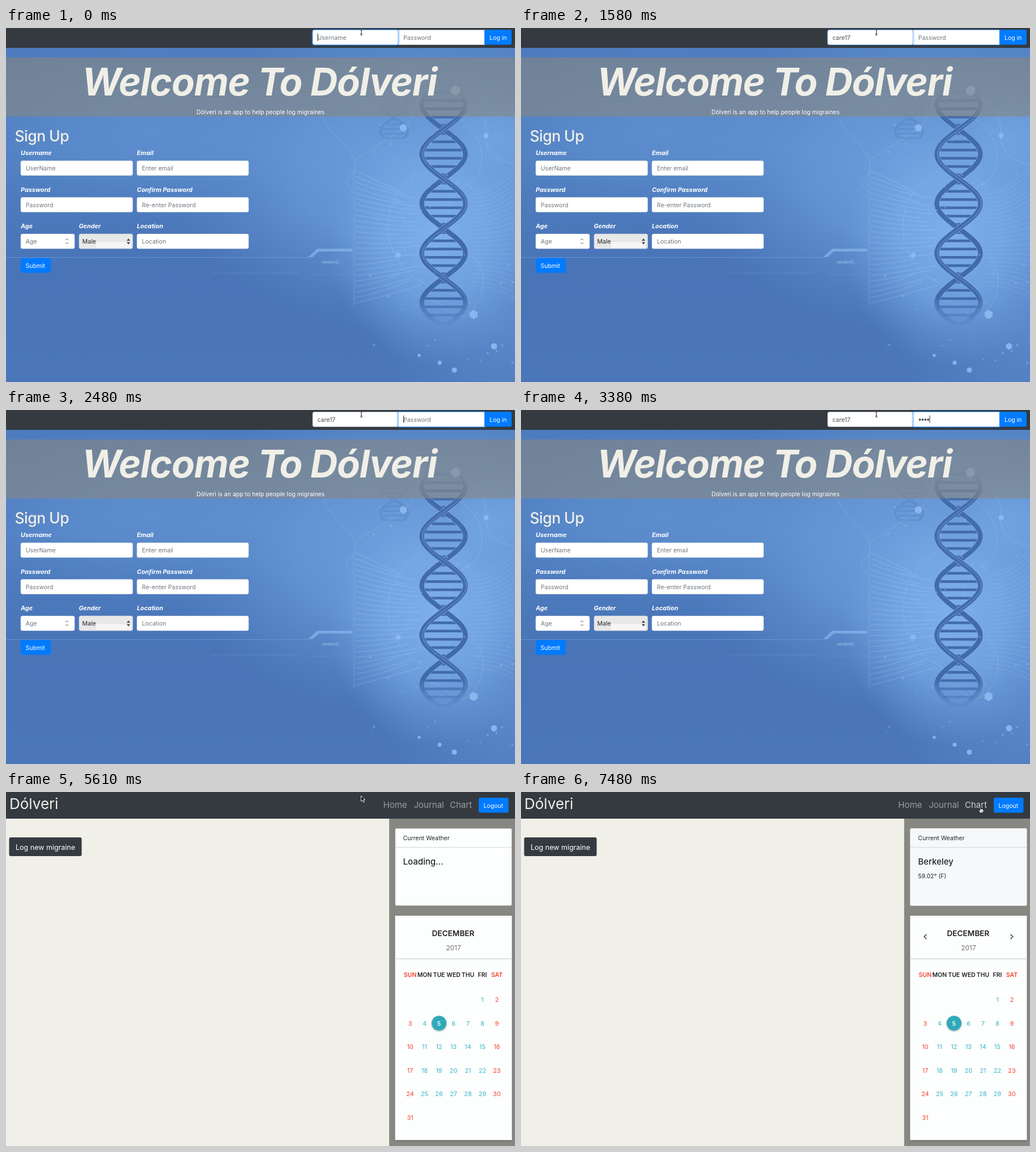
Write an HTML page that moves like this. It is 898 by 624 pixels and loops after 8000 ms.

```html
<!DOCTYPE html>
<html lang="en">
<head>
<meta charset="utf-8">
<title>Migraine log</title>
<style>
html, body { margin: 0; width: 100%; height: 100%; overflow: hidden; background: #343a40; }
svg { display: block; width: 898px; height: 624px; }
text { font: 400 10.5px Inter, Roboto, sans-serif; font-optical-sizing: none; fill: #fff; white-space: pre; }
.title { font-size: 67px; font-weight: 700; font-style: italic; letter-spacing: -.02em; fill: #f0efe7; }
.h2 { font-size: 26.5px; font-weight: 500; letter-spacing: -.02em; fill: #f0efe7; }
.label { font-size: 10.8px; font-weight: 700; font-style: italic; }
.hint { fill: #6f777f; }
.typed { fill: #495057; }
.dark { fill: #212529; }
.brand { font-size: 26px; fill: #f0efe7; }
.link { font-size: 15px; fill: #9a9da0; }
.hover { fill: #ced0d2; }
.big { font-size: 15px; font-weight: 500; fill: #212529; }
.mid { text-anchor: middle; }
.month { font-size: 13.6px; font-weight: 600; fill: #212121; }
.year { font-size: 12px; fill: #757575; }
.wk { font-size: 10.4px; font-weight: 600; }
.day { font-size: 10.8px; }
.tiny { font-size: 7px; fill: #a9c9ef; }
.box { fill: #fff; stroke: #ced4da; stroke-width: .5; }
.blue { fill: #007bff; }
.focus rect { fill: none; stroke: #80bdff; }
.focus .halo { stroke: #007bff; stroke-width: 3; stroke-opacity: .25; }
.arc { fill: none; stroke: #b5d2f5; stroke-width: .8; opacity: .35; }
.chev { fill: none; stroke: #444; stroke-width: 1.6; }
</style>
</head>
<body>
<svg viewBox="0 0 898 624" xmlns="http://www.w3.org/2000/svg">
  <defs>
    <linearGradient id="base" x2="0" y2="1">
      <stop offset="0" stop-color="#4d7bbe"/><stop offset=".3" stop-color="#5080c2"/>
      <stop offset=".65" stop-color="#4974b8"/><stop offset="1" stop-color="#4b77ba"/>
    </linearGradient>
    <radialGradient id="glow">
      <stop offset="0" stop-color="#71a2e0"/><stop offset=".45" stop-color="#6b9bd9" stop-opacity=".85"/>
      <stop offset="1" stop-color="#5f90d0" stop-opacity="0"/>
    </radialGradient>
    <radialGradient id="bright">
      <stop offset="0" stop-color="#83b6f2"/><stop offset=".5" stop-color="#7cafec" stop-opacity=".7"/>
      <stop offset="1" stop-color="#70a2e0" stop-opacity="0"/>
    </radialGradient>
    <linearGradient id="strand" gradientUnits="userSpaceOnUse" x1="0" y1="100" x2="0" y2="526">
      <stop offset="0" stop-color="#436cab" stop-opacity="0"/><stop offset=".12" stop-color="#436cab"/>
      <stop offset=".88" stop-color="#416aaa"/><stop offset="1" stop-color="#416aaa" stop-opacity="0"/>
    </linearGradient>
    <linearGradient id="shine" gradientUnits="userSpaceOnUse" x1="0" y1="110" x2="0" y2="510">
      <stop offset="0" stop-color="#86b0e6" stop-opacity="0"/><stop offset=".15" stop-color="#86b0e6"/>
      <stop offset=".85" stop-color="#86b0e6"/><stop offset="1" stop-color="#86b0e6" stop-opacity="0"/>
    </linearGradient>
    <pattern id="dots" width="5" height="5" patternUnits="userSpaceOnUse">
      <circle cx="1.2" cy="1.2" r=".8" fill="#7fabe2"/><circle cx="3.7" cy="3.7" r=".8" fill="#7fabe2"/>
    </pattern>
    <radialGradient id="ring">
      <stop offset=".55" stop-color="#fff" stop-opacity="0"/><stop offset=".78" stop-color="#fff"/>
      <stop offset="1" stop-color="#fff" stop-opacity="0"/>
    </radialGradient>
    <mask id="fringe"><ellipse cx="610" cy="250" rx="400" ry="230" fill="url(#ring)"/></mask>
    <filter id="soft" x="-20%" y="-20%" width="140%" height="140%">
      <feDropShadow dx="0" dy="1" stdDeviation="1.5" flood-opacity=".4"/>
    </filter>
    <path id="arrow" d="M0 0V9.8L2.3 7.7 4 11.6 5.6 10.9 4 7.1H7Z" fill="#000" stroke="#fff" stroke-width=".9"/>
    <path id="bar" d="M-2 -5Q0 -5 0 -3.5Q0 -5 2 -5M0 -4V4M-2 4.5Q0 4.5 0 3Q0 4.5 2 4.5M-1.2 1.5H1.2" fill="none"/>
    <g id="beam">
      <use href="#bar" stroke="#fff" stroke-width="2" stroke-opacity=".5"/>
      <use href="#bar" stroke="#2b2030"/>
    </g>
    <g id="hand">
      <path d="M-1.6 -5Q-.6 -6 .2 -5V-1.5Q1.3 -2 1.8 -1.2Q2.9 -1.6 3.3 -.7Q4.6 -.8 4.6 .6V2.5Q4.4 4 3.6 5.5H-1.6Q-2.6 3.4 -4.4 1.2Q-4.4 0 -3.2 .2L-1.6 1.6Z" fill="#fff" stroke="#000" stroke-width=".9"/>
      <path d="M.3 2V4M1.7 2V4M3 2V4" stroke="#000" stroke-width=".6"/>
    </g>
    <g id="userFocus" class="focus">
      <rect class="halo" x="540" y="2.5" width="153" height="28" rx="4"/>
      <rect x="541" y="3.5" width="151" height="26" rx="3"/>
    </g>
    <g id="passFocus" class="focus">
      <rect class="halo" x="691" y="2.5" width="155" height="28" rx="2"/>
      <rect x="692" y="3.5" width="153" height="26"/>
    </g>
  </defs>

  <g data-on="0-5610">
    <rect y="35" width="898" height="589" fill="url(#base)"/>
    <ellipse cx="690" cy="245" rx="400" ry="290" fill="url(#glow)" opacity=".85"/>
    <ellipse cx="900" cy="350" rx="290" ry="400" fill="url(#glow)" opacity=".6"/>
    <ellipse cx="250" cy="180" rx="350" ry="160" fill="url(#glow)" opacity=".4"/>
    <ellipse cx="755" cy="365" rx="190" ry="230" fill="url(#bright)" opacity=".8"/>
    <ellipse cx="870" cy="190" rx="110" ry="90" fill="url(#bright)" opacity=".35"/>
    <rect y="35" width="898" height="430" fill="url(#dots)" mask="url(#fringe)" opacity=".16"/>
    <g id="art"></g>
    <path d="M0 404.5H533L549 391.5H611" fill="none" stroke="#7fa9de" stroke-opacity=".55"/>
    <path d="M533 404L549 389H611V394H552L541 404Z" fill="#83b0e8" opacity=".75"/>
    <path d="M362 432H520M540 434H612" stroke="#7ba7de" stroke-opacity=".12" stroke-width="3"/>
    <text class="tiny" x="557" y="415">random|| ; :</text>
    <rect y="52" width="898" height="104" fill="#888880" fill-opacity=".6"/>
    <text class="title" x="134" y="119">Welcome To Dólveri</text>
    <text class="mid" x="449" y="152">Dólveri is an app to help people log migraines</text>

    <rect width="898" height="35" fill="#343a40"/>
    <rect class="box" x="541" y="3.5" width="151" height="26" rx="3"/>
    <rect class="box" x="692" y="3.5" width="153" height="26"/>
    <use href="#userFocus" data-on="0-1580"/>
    <g data-on="1580-1730" opacity=".5"><use href="#userFocus"/><use href="#passFocus"/></g>
    <use href="#passFocus" data-on="1730-5610"/>
    <path class="blue" d="M844 3H889Q892 3 892 6V26.5Q892 29.5 889 29.5H844Z"/>
    <text x="853" y="20.5">Log in</text>
    <g id="login"></g>

    <text class="h2" x="15.5" y="200">Sign Up</text>
    <g id="form"></g>
    <path d="M105 374L107.5 371.5 110 374M105 378L107.5 380.5 110 378" fill="none" stroke="#555"/>
    <rect x="129" y="363" width="94.5" height="26" rx="3" fill="#e8e8e8" stroke="#ced4da" stroke-width=".7"/>
    <rect x="159" y="377.5" width="61" height="10" fill="#f6f6f6"/>
    <text class="dark" x="134.5" y="380">Male</text>
    <path d="M213 375L216 371 219 375ZM213 377.5L216 381.5 219 377.5Z" fill="#444"/>
    <rect class="blue" x="26" y="405.5" width="53" height="26" rx="3"/>
    <text x="34.5" y="422.5">Submit</text>
    <use href="#beam" x="627" y="8" data-on="0-4260"/>
    <use href="#arrow" x="626.5" y="6.5" data-on="4260-5610"/>
  </g>

  <g data-on="5610-8000">
    <rect width="898" height="624" fill="#f0efe8"/>
    <rect x="676" y="47" width="222" height="577" fill="#888883"/>
    <rect width="898" height="47" fill="#343a40"/>
    <text class="brand" x="6" y="29.5">Dólveri</text>
    <text class="link" x="665.5" y="27.5">Home</text>
    <text class="link" x="719.5" y="27.5">Journal</text>
    <text class="link" x="783" y="27.5" data-on="5610-7180">Chart</text>
    <text class="link hover" x="783" y="27.5" data-on="7180-8000">Chart</text>
    <rect class="blue" x="834" y="10" width="52.5" height="26.5" rx="3"/>
    <text x="842.5" y="27.5">Logout</text>
    <rect x="5.5" y="80" width="128" height="33" rx="3" fill="#343a40"/>
    <text x="17" y="101.5" style="font-size:12.5px">Log new migraine</text>

    <rect x="686.5" y="64" width="206" height="136.5" rx="2.5" fill="#fdfefe" stroke="#7c7c78" stroke-width=".6"/>
    <rect x="686.5" y="64" width="206" height="136.5" rx="2.5" fill="#f7f8fa" data-on="6740-8000"/>
    <path d="M686.5 97.5H892.5" stroke="#d6d7d7"/>
    <text class="dark" x="700.5" y="85">Current Weather</text>
    <text class="big" x="700.5" y="127.5" data-on="5610-6740">Loading...</text>
    <g data-on="6740-8000">
      <text class="big" x="700.5" y="127.5">Berkeley</text>
      <text class="dark" x="700.5" y="151.5">59.02° (F)</text>
    </g>

    <rect x="686.5" y="218" width="206" height="395.5" fill="#fdfefe" filter="url(#soft)"/>
    <rect x="686.5" y="293" width="206" height="1.5" fill="#dadcdc"/>
    <rect x="686.5" y="294.5" width="206" height="2" fill="#f0f1f1"/>
    <text class="month mid" x="789" y="253.5">DECEMBER</text>
    <text class="year mid" x="789.5" y="278.5">2017</text>
    <path class="chev" d="M715.5 250.8L711.2 255 715.5 259.2M863.5 250.8L867.8 255 863.5 259.2" data-on="5900-8000"/>
    <circle cx="764" cy="407.5" r="13" fill="#2faab8" filter="url(#soft)"/>
    <g id="calendar"></g>
    <use href="#arrow" x="626.5" y="6.5" data-on="5610-6740"/>
    <use href="#arrow" x="615" y="9" data-on="6740-6890"/>
    <use href="#arrow" x="798" y="33" data-on="6890-7180"/>
    <use href="#hand" x="806" y="33" data-on="7180-7330"/>
    <use href="#hand" x="810" y="32" data-on="7330-7480"/>
    <use href="#hand" x="811.5" y="31.5" data-on="7480-8000"/>
  </g>
</svg>
<script>
const LOOP = 8000;
const byId = id => document.getElementById(id);

function add(parent, tag, attrs, text) {
  const el = document.createElementNS('http://www.w3.org/2000/svg', tag);
  for (const key in attrs) el.setAttribute(key, attrs[key]);
  if (text) el.textContent = text;
  return parent.appendChild(el);
}

let seed = 7;
const rand = () => (seed = seed * 16807 % 2147483647) / 2147483647;

// Double helix: crossings lie half a turn apart, six rungs between them.
function helix(parent, cx, cross, half, amp, top, bottom, width) {
  const swing = y => amp * Math.sin(Math.PI * (y - cross) / half);
  const path = (sign, dx = 0) => {
    let d = '';
    for (let y = top; y <= bottom; y += 3) d += (d ? 'L' : 'M') + (cx + dx + sign * swing(y)).toFixed(1) + ' ' + y;
    return d;
  };
  const line = (d, stroke, w) => add(parent, 'path', { d, stroke, 'stroke-width': w, fill: 'none' });
  const step = half / 6;
  const first = cross + step / 2 - step * Math.floor((cross - top) / step);
  for (let y = first; y < bottom; y += step) {
    const s = Math.abs(swing(y));
    line(`M${cx - s} ${y}L${cx + s} ${y + .1}`, 'url(#strand)', width * .55);
  }
  for (const sign of [-1, 1]) {
    line(path(sign), 'url(#shine)', width * 1.15);
    line(path(sign), 'url(#strand)', width);
  }
  line(path(1, 1.5), 'url(#shine)', .7);
}

function drawArt(art) {
  for (let i = 0; i < 25; i++) {
    const a = 252 + i * 9.7, b = 286 + i * 7;
    const end = 690 + rand() * 45;
    const row = { fill: 'none', stroke: '#c3dbf8', 'stroke-width': 2, 'stroke-dasharray': '1.2 1.4' };
    add(art, 'path', { ...row, d: `M617 ${a}Q665 ${(a + b) / 2 + 4} ${end} ${b}`, opacity: .32 });
    add(art, 'path', { ...row, d: `M${818 + rand() * 15} ${b}Q860 ${b} 898 ${a - 8}`, opacity: .2 });
  }
  add(art, 'path', { d: 'M614 250V490', stroke: '#8db6ea', 'stroke-opacity': .15, 'stroke-width': 4 });
  [
    'M735 252C690 275 660 330 680 385S725 440 745 455',
    'M800 160C850 190 850 260 815 275S770 330 800 360',
    'M560 160C580 200 620 215 616 245S585 255 612 290',
    'M700 60C735 95 735 150 701 176S640 215 617 232',
    'M815 395C850 420 850 470 820 500S770 470 735 480',
    'M793 110C830 130 850 160 847 190S870 235 898 240'
  ].forEach(d => add(art, 'path', { d, class: 'arc' }));

  const faint = add(art, 'g', { opacity: .22 });
  helix(faint, 685, 110, 48, 24, 50, 196, 5);
  helix(art, 772, 266, 87.3, 38.5, 64, 526, 8.5);

  const hex = (x, y, r, opacity) => {
    const pts = [0, 1, 2, 3, 4, 5].map(k => [x + r * Math.sin(k * Math.PI / 3), y + r * Math.cos(k * Math.PI / 3)]);
    add(art, 'polygon', { points: pts.join(' '), fill: '#8fbcf2', opacity });
  };
  [[793, 110, 9], [701, 176, 7], [847, 190, 5], [825, 505, 8], [861, 561, 6], [791, 603, 5], [692, 400, 5], [765, 590, 4], [729, 577, 3]]
    .forEach(([x, y, r]) => hex(x, y, r, .85));
  for (let i = 0; i < 60; i++) hex(640 + rand() * 255, 170 + rand() * 440, .8 + rand() * 1.6, .45);
}

function drawForm(form) {
  const field = (x, y, w, label, hint) => {
    add(form, 'text', { class: 'label', x, y: y - 10 }, label);
    if (!hint) return;
    add(form, 'rect', { class: 'box', x, y, width: w, height: 26, rx: 3 });
    add(form, 'text', { class: 'hint', x: x + 8.8, y: y + 17 }, hint);
  };
  field(26, 234, 197.5, 'Username', 'UserName');
  field(231, 234, 197, 'Email', 'Enter email');
  field(26, 298.5, 197.5, 'Password', 'Password');
  field(231, 298.5, 197, 'Confirm Password', 'Re-enter Password');
  field(26, 363, 95, 'Age', 'Age');
  field(128.5, 363, 95, 'Gender');
  field(231, 363, 197, 'Location', 'Location');
}

function drawLogin(login) {
  const span = (from, to) => ({ 'data-on': from + '-' + to });
  const caret = (x, from, to) => add(login, 'rect', { x, y: 9.5, width: 1, height: 13.5, fill: '#333', ...span(from, to) });
  const hint = (x, text, to) => add(login, 'text', { class: 'hint', x, y: 20.5, ...span(0, to) }, text);

  hint(549.5, 'Username', 150);
  caret(549.5, 0, 150);
  const name = 'care17';
  const typed = [[150, 1], [345, 3], [540, 4], [1130, 5], [1280, 6], [5610]];
  const caretEnd = [345, 540, 980, 1280, 1580];
  typed.slice(0, -1).forEach(([from, n], i) => {
    const el = add(login, 'text', { class: 'typed', x: 549.5, y: 20.5, ...span(from, typed[i + 1][0]) }, name.slice(0, n));
    caret(549.8 + el.getComputedTextLength(), from, caretEnd[i]);
  });

  hint(701, 'Password', 2930);
  caret(701, 1730, 2180);
  caret(701, 2480, 2930);
  const keys = [2930, 3080, 3230, 3380, 3670, 3820, 3970, 4110, 5610];
  keys.slice(0, -1).forEach((from, i) => {
    add(login, 'circle', { cx: 703.8 + 4.85 * i, cy: 17, r: 1.9, fill: '#495057', ...span(from, 5610) });
    caret(701.2 + 4.85 * (i + 1), from, keys[i + 1]);
  });
}

function drawCalendar(cal) {
  const colX = c => 713 + c * 25.5;
  const weekend = c => c % 6 === 0;
  const put = (c, y, cls, fill, text) => add(cal, 'text', { class: cls + ' mid', x: colX(c), y, style: 'fill:' + fill }, text);
  ['SUN', 'MON', 'TUE', 'WED', 'THU', 'FRI', 'SAT'].forEach((name, c) => put(c, 325.5, 'wk', weekend(c) ? '#f4432e' : '#212121', name));
  for (let day = 1; day <= 31; day++) {
    const cell = day + 4, c = cell % 7;
    const y = 370 + Math.floor(cell / 7) * 41.6;
    if (day === 5) put(c, y, 'wk', '#fff', '5');
    else put(c, y, 'day', weekend(c) ? '#f4432e' : '#35b5c8', String(day));
  }
}

drawArt(byId('art'));
drawForm(byId('form'));
drawLogin(byId('login'));
drawCalendar(byId('calendar'));

const timed = [...document.querySelectorAll('[data-on]')].map(el => [el, ...el.dataset.on.split('-').map(Number)]);
let start;
function render(now) {
  start ??= now;
  const t = (now - start) % LOOP;
  for (const [el, from, to] of timed) el.style.display = t >= from && t < to ? '' : 'none';
  requestAnimationFrame(render);
}
requestAnimationFrame(render);
</script>
</body>
</html>
```
